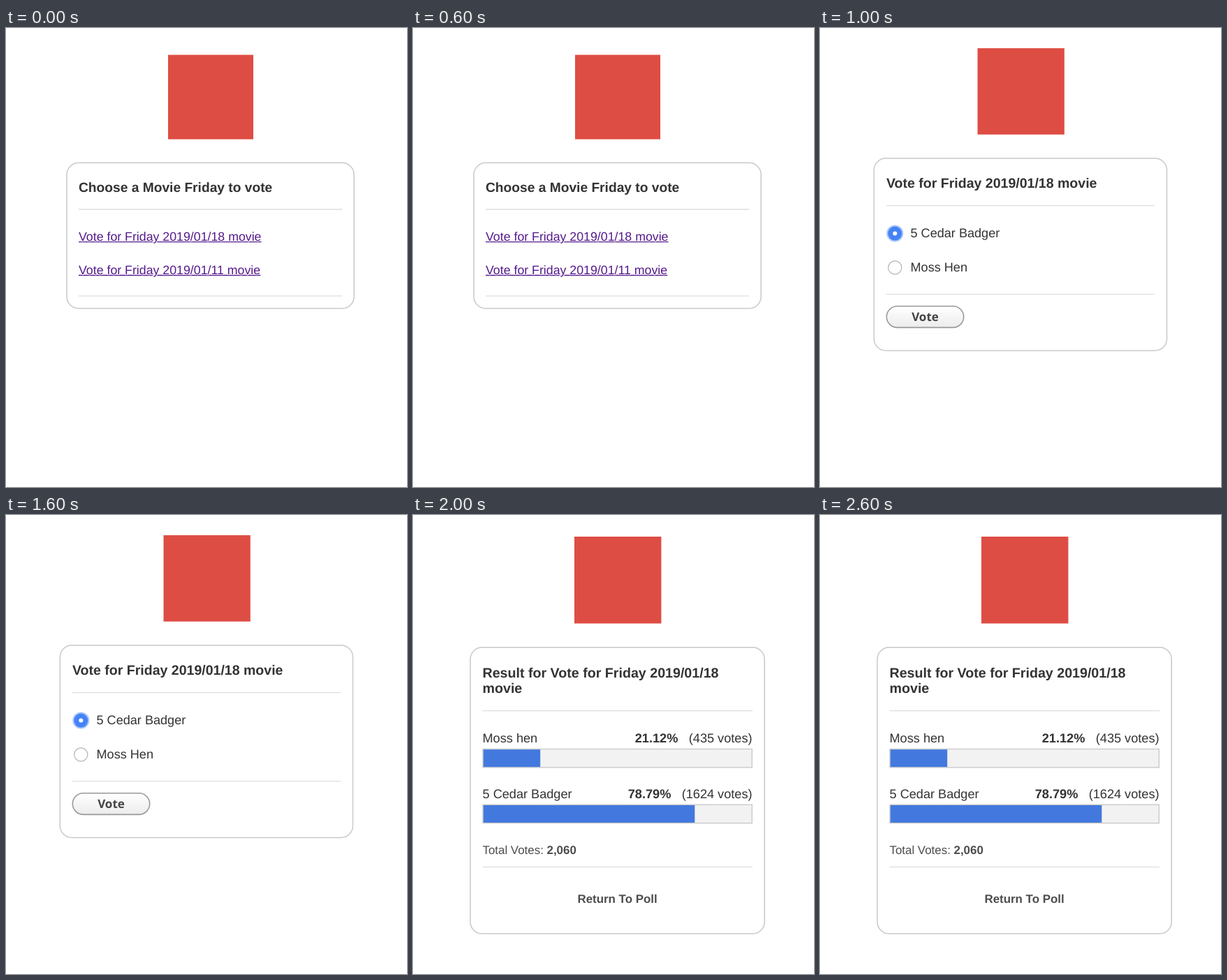
An HTML page that plays this animation: 574x658 px, repeating every 3 s.

```html
<!DOCTYPE html>
<html lang="en">
<head>
<meta charset="utf-8">
<title>Movie Friday poll</title>
<style>
  html, body { margin: 0; width: 100%; height: 100%; overflow: hidden; background: #fff; }
  svg { display: block; width: 574px; height: 658px; }
  text {
    font-family: "Liberation Sans", Arial, sans-serif;
    fill: #333;
    text-rendering: geometricPrecision;
  }
  .bold { font-weight: 700; }
  .end { text-anchor: end; }
  .mid { text-anchor: middle; }
  .soft { fill: #4d4d4d; }
  .logo { fill: #de4d43; }
  .card { fill: #fff; stroke: #c9c9c9; stroke-width: 1.5; }
  .rule { stroke: #dedede; stroke-width: 1.3; }
  .link text { fill: #551a8b; stroke: #fff; stroke-width: 2.2; paint-order: stroke; }
  .link line { stroke: #551a8b; stroke-width: 1.3; }
  .track { fill: #f2f2f2; stroke: #cbcbcb; stroke-width: 1.4; }
  .fill { fill: #4379de; }

  .screen { visibility: hidden; animation: show 3s step-end infinite; }
  #vote { animation-delay: -2s; }
  #result { animation-delay: -1s; }
  @keyframes show {
    0% { visibility: visible; }
    33.3333%, 100% { visibility: hidden; }
  }
</style>
</head>
<body>
<svg viewBox="0 0 574 658">
  <defs>
    <linearGradient id="shine" x2="0" y2="1">
      <stop stop-color="#fff"/>
      <stop offset="1" stop-color="#ececec"/>
    </linearGradient>
  </defs>

  <g class="screen" id="choose" font-size="17.75">
    <rect class="logo" x="232" y="38.5" width="122" height="121"/>
    <rect class="card" x="87" y="193.2" width="411.2" height="208.8" rx="17"/>
    <text class="bold" x="104" y="234.8" font-size="19.2">Choose a Movie Friday to vote</text>
    <path class="rule" d="M104 260H481M104 384.2H481"/>
    <g class="link">
      <line x1="104" y1="306.6" x2="365.5" y2="306.6"/>
      <text x="104" y="304.6">Vote for Friday 2019/01/18 movie</text>
      <line x1="104" y1="354.5" x2="364.2" y2="354.5"/>
      <text x="104" y="352.5">Vote for Friday 2019/01/11 movie</text>
    </g>
  </g>

  <g class="screen" id="vote" font-size="18.1">
    <rect class="logo" x="225.5" y="29" width="124.3" height="123.7"/>
    <rect class="card" x="77.3" y="186.7" width="419.2" height="275.8" rx="17"/>
    <text class="bold" x="95" y="229" font-size="19.55">Vote for Friday 2019/01/18 movie</text>
    <path class="rule" d="M95 254.7H479M95 381.6H479"/>
    <circle cx="107.3" cy="294.6" r="12" fill="#a9c7f8"/>
    <circle cx="107.3" cy="294.6" r="10" fill="#4583f6"/>
    <circle cx="107.3" cy="294.6" r="3" fill="#fff"/>
    <text x="129.5" y="300.4">5 Cedar Badger</text>
    <circle cx="107.3" cy="343.5" r="9.6" fill="#fff" stroke="#b6b6b6" stroke-width="1.2"/>
    <text x="129.5" y="349.2">Moss Hen</text>
    <rect x="95.3" y="398.8" width="110.4" height="30.6" rx="15.3" fill="url(#shine)" stroke="#999" stroke-width="1.6"/>
    <text class="bold mid" x="150.5" y="420" font-size="17" style="font-family: 'Noto Sans', sans-serif; fill: #444">Vote</text>
  </g>

  <g class="screen" id="result" font-size="18.15">
    <rect class="logo" x="231" y="31" width="124.4" height="124.5"/>
    <rect class="card" x="82" y="189.8" width="421.2" height="410.4" rx="17"/>
    <g class="bold" font-size="19.65">
      <text x="99.5" y="232.6">Result for Vote for Friday 2019/01/18</text>
      <text x="99.5" y="255">movie</text>
    </g>
    <path class="rule" d="M99.5 280.6H486M99.5 504.6H486"/>

    <text x="99.5" y="326.4">Moss hen</text>
    <text class="bold end" x="379.3" y="326.4">21.12%</text>
    <text class="end" x="485.5" y="326.4">(435 votes)</text>
    <rect class="track" x="100" y="335.5" width="385.3" height="26.4"/>
    <rect class="fill" x="100.7" y="336.2" width="81.5" height="25"/>

    <text x="99.5" y="406">5 Cedar Badger</text>
    <text class="bold end" x="369.3" y="406">78.79%</text>
    <text class="end" x="485.5" y="406">(1624 votes)</text>
    <rect class="track" x="100" y="415.3" width="385.3" height="26.4"/>
    <rect class="fill" x="100.7" y="416" width="302.6" height="25"/>

    <text class="soft" x="99.5" y="486" font-size="16.9">Total Votes: <tspan class="bold">2,060</tspan></text>
    <text class="bold mid soft" x="292.6" y="556" font-size="16.9">Return To Poll</text>
  </g>
</svg>
</body>
</html>
```
